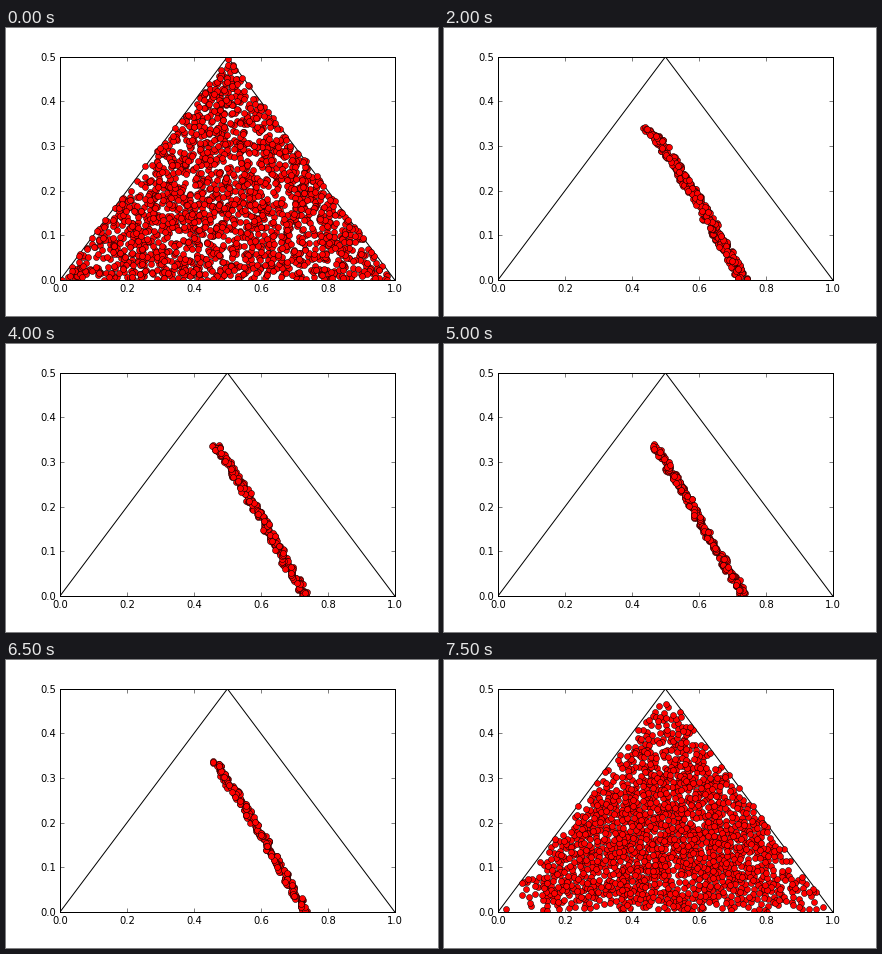
Write a matplotlib script that moves like this. It is 432 px wide and 288 px high and loops after 8 s.

```python
import numpy as np
import matplotlib.pyplot as plt
from matplotlib.animation import FuncAnimation

FRAMES, STEP = 16, 500
CORNERS = np.array([[0, 0], [1, 0], [0.5, 0.5]])
PX = np.array([334.8, 446.4])          # pixels per data unit
CLOUDS = {11: 1300, 14: 1450, 15: 1600}

plt.rcParams.update({
    "font.family": "DejaVu Sans",
    "font.size": 10,
    "axes.linewidth": 1.0,
    "path.simplify": False,
})


def in_triangle(rng, n, alpha):
    return rng.dirichlet([alpha] * 3, n) @ CORNERS


def cloud(rng, n, gap=2.6):
    """Centre-heavy scatter whose points keep a small distance apart."""
    kept = np.empty((n, 2))
    count = 0
    for p in in_triangle(rng, 4 * n, 1.55) * PX:
        if count == n:
            break
        if count == 0 or ((kept[:count] - p) ** 2).sum(1).min() > gap ** 2:
            kept[count] = p
            count += 1
    return kept[:count] / PX


def band(rng, i):
    """Narrow ridge that tightens and straightens with each round."""
    decay = np.exp(-(i - 1) / 2.2)
    half = 0.0095 + 0.021 * decay
    bend = 0.045 * decay
    centres = int(95 + 130 * decay)
    y = (np.arange(centres) + rng.uniform(0, 1, centres)) / centres * 0.34
    x = 0.732 - 0.72 * y - 0.2 * y ** 2 - bend * (y / 0.34) ** 6
    x += rng.uniform(-half, half, centres)
    pts = np.repeat(np.column_stack([x, y]), 3, axis=0)
    pts += rng.normal(0, 0.0025, pts.shape)
    pts[:, 1] = np.clip(np.abs(pts[:, 1]), 0, 0.346)
    return rng.permutation(pts)


def points(i):
    rng = np.random.default_rng(40 + i)
    if i == 0:
        return in_triangle(rng, 2000, 1)
    if i in CLOUDS:
        return cloud(rng, CLOUDS[i])
    return band(rng, i)


fig = plt.figure(figsize=(6, 4), dpi=72, facecolor="white")
ax = fig.add_axes([0.125, 0.125, 0.775, 0.775])
ax.set(xlim=(0, 1), ylim=(0, 0.5),
       xticks=np.linspace(0, 1, 6), yticks=np.linspace(0, 0.5, 6))
ax.set_axisbelow(False)
ax.xaxis.set_major_formatter("{x:.1f}")
ax.yaxis.set_major_formatter("{x:.1f}")
ax.tick_params(direction="in", top=True, right=True, length=4, width=0.5, pad=4)

ax.plot([0, 0.5, 1], [0, 0.5, 0], "k-", lw=1)
dots, = ax.plot([], [], "o", ms=6, mfc="red", mec="black", mew=0.5)


def update(i):
    dots.set_data(*points(i).T)
    return dots,


anim = FuncAnimation(fig, update, frames=FRAMES, interval=STEP,
                     repeat=True, repeat_delay=0, blit=False)
plt.show()
```
